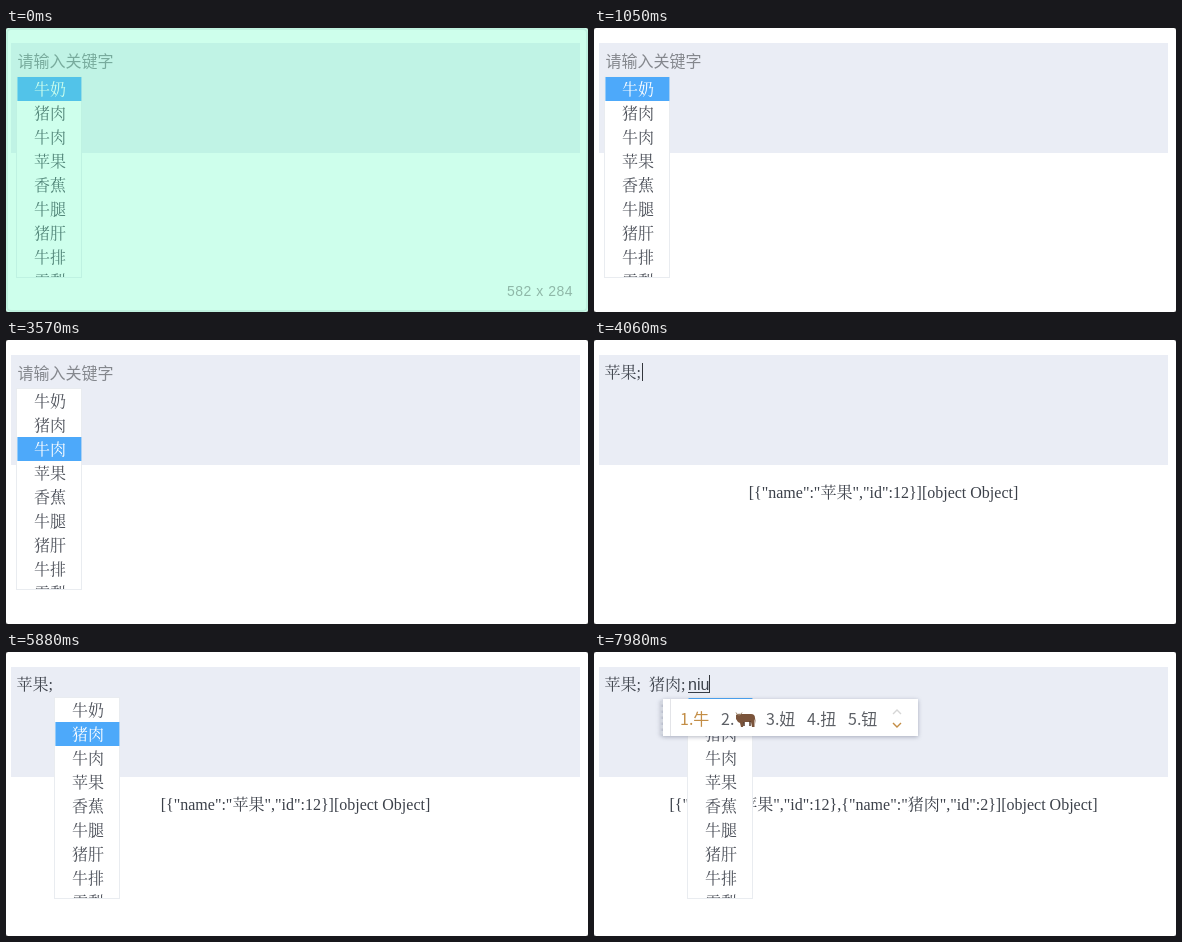
Recreate the animation shown at these times as an HTML page. Size 582x284 px, loop 8000 ms.

```html
<!DOCTYPE html>
<html lang="zh-CN">
<head>
<meta charset="utf-8">
<style>
  html, body { margin: 0; width: 100%; height: 100%; overflow: hidden; background: #555; }
  svg { display: block; width: 582px; height: 284px; }
  text { font: 300 16px "Liberation Serif", "Noto Serif CJK SC", "Noto Sans CJK SC", "Noto Sans CJK", serif; fill: #3c414a; white-space: pre; }
  .sans { font-family: "Noto Sans CJK SC", "Noto Sans CJK", sans-serif; }
  #rows text { fill: #4c5059; }
  #hint { fill: #84878d; }
  #result { text-anchor: middle; }
  #caret { fill: #33363c; }
  #typed { font-family: "Liberation Sans", sans-serif; }
  #ime { filter: drop-shadow(0 1px 2px rgba(40, 50, 80, .35)); }
  #ime text { fill: #5d6066; }
  #ime text.first { fill: #c38d45; }
  #size { font: 14px "Liberation Sans", sans-serif; letter-spacing: .5px; fill: #8fb8a8; }
</style>
</head>
<body>
<svg viewBox="0 0 582 284">
  <defs><clipPath id="clip"><rect width="66" height="200" x="-1"/></clipPath></defs>
  <rect width="582" height="284" rx="2.5" fill="#fff"/>
  <rect x="5" y="15" width="569" height="110" fill="#eaedf5"/>
  <text id="hint" class="sans" x="11.4" y="39"></text>
  <text id="value" x="10.5" y="38"></text>
  <text id="result" x="289.5" y="158"></text>
  <g id="menu">
    <rect x="-.5" y="-.5" width="65" height="201" fill="#fff" stroke="#e9ecf0"/>
    <g id="rows" clip-path="url(#clip)"><rect id="bar" x=".4" width="64" height="24" fill="#4da9fa"/></g>
  </g>
  <g id="input">
    <text id="typed" x="94" y="38"></text>
    <rect id="line" x="94" y="40" height="1" fill="#363c46"/>
  </g>
  <rect id="caret" width="1" height="18"/>
  <g id="ime">
    <rect x="69" y="47" width="255" height="37" fill="#fff"/>
    <path d="M67.5 49V83" stroke="#d3d7e0" stroke-width="3" stroke-dasharray="3.5 2.5"/>
    <path d="M76.5 47V84" stroke="#e3e4e8"/>
    <g id="words"></g>
    <g id="ox" fill="#7b543b">
      <path d="M142 63Q144 61 147 62L157 62Q161 62 161 66L162 72L160.500 67V75H158L157 70H150L149 75H147L146 71L144 70L142 67Z"/>
      <path d="M142 60.500Q143 63 145 63Q147 63 148 60.500" fill="none" stroke="#a08a70"/>
      <path d="M150 70V74M156 69V74" stroke="#553a2b" stroke-width="1.500"/>
    </g>
    <g fill="none" stroke-width="1.400">
      <path d="M299 62L303 58L307 62" stroke="#d6d6d6"/>
      <path d="M299 71L303 75L307 71" stroke="#c38d45"/>
    </g>
  </g>
  <g id="tint">
    <rect width="582" height="284" rx="2.5" fill="rgb(95,255,192)" opacity=".3"/>
    <rect x="1" y="1" width="580" height="282" rx="4" fill="none" stroke="#a9dccb" stroke-width="2" opacity=".4"/>
    <text id="size" x="501" y="268">582 x 284</text>
  </g>
</svg>
<script>
const $ = id => document.getElementById(id);
const LOOP = 8000, BLINK = 1010, LIT = 490;
const foods = ['牛奶', '猪肉', '牛肉', '苹果', '香蕉', '牛腿', '猪肝', '牛排', '雪梨'];
const slots = [86, 127, 172, 213, 254];

function addText(parent, x, y, cls) {
  const el = document.createElementNS('http://www.w3.org/2000/svg', 'text');
  el.setAttribute('x', x);
  el.setAttribute('y', y);
  if (cls) el.setAttribute('class', cls);
  return parent.appendChild(el);
}
const rows = foods.map((food, i) => {
  const el = addText($('rows'), 17, 18 + i * 24);
  el.textContent = food;
  return el;
});
const words = slots.map((x, i) => addText($('words'), x, 73, i ? 'sans' : 'sans first'));

// Each stage begins when an item is chosen.
const stages = [
  { at: 0, blink: 560, hint: '请输入关键字', value: '', result: '',
    menu: [11, 49], open: 0, caret: [11, 24], moves: [3220, 3430, 3640] },
  { at: 4060, blink: 4060, hint: '', value: '苹果;', result: '[{"name":"苹果","id":12}][object Object]',
    menu: [49, 46], open: 4690, caret: [48, 23], moves: [5460] },
  { at: 6580, blink: 6580, hint: '', value: '苹果;  猪肉;',
    result: '[{"name":"苹果","id":12},{"name":"猪肉","id":2}][object Object]',
    menu: [94, 46], open: 7210, caret: [93, 23], moves: [] }
];
const typing = [
  { at: 7420, text: 'n', width: 9, words: '你那年呢能' },
  { at: 7560, text: 'ni', width: 12.5, words: '你呢泥尼拟' },
  { at: 7770, text: 'niu', width: 21, words: '牛 妞扭钮' }
];

const latest = (list, t) => list.filter(s => t >= s.at).pop();
const show = (id, on) => $(id).setAttribute('visibility', on ? 'visible' : 'hidden');
const move = (id, x, y) => $(id).setAttribute('transform', `translate(${x} ${y})`);
function setText(el, text) {
  if (el.textContent !== text) el.textContent = text;
}

function draw(t) {
  const s = latest(stages, t), key = latest(typing, t);
  show('tint', t < 70);
  setText($('hint'), s.hint);
  setText($('value'), s.value);
  setText($('result'), s.result);

  const picked = s.moves.filter(m => t >= m).length;
  show('menu', t >= s.open);
  move('menu', ...s.menu);
  $('bar').setAttribute('y', picked * 24);
  rows.forEach((row, i) => { row.style.fill = i === picked ? '#fff' : ''; });

  show('input', key);
  show('ime', key);
  show('ox', key && key.text === 'niu');
  if (key) {
    setText($('typed'), key.text);
    $('line').setAttribute('width', key.width);
    words.forEach((el, i) => setText(el, `${i + 1}.${key.words[i].trim()}`));
  }
  const lit = t >= s.blink && (t - s.blink) % BLINK < LIT;
  show('caret', key || lit);
  move('caret', key ? 94 + key.width : s.caret[0], s.caret[1]);
}

const start = performance.now();
function tick() {
  draw((performance.now() - start) % LOOP);
  requestAnimationFrame(tick);
}
tick();
</script>
</body>
</html>
```
